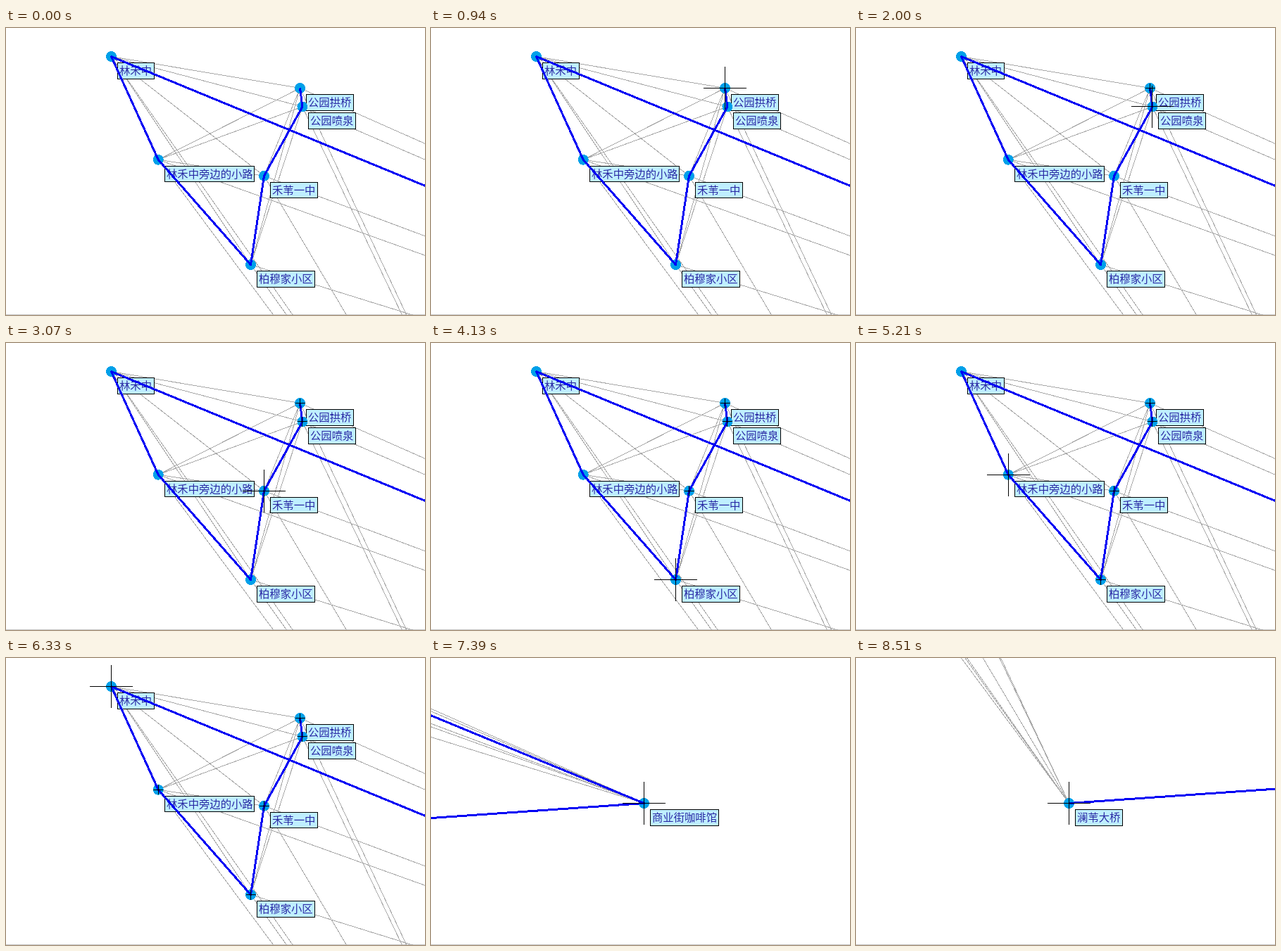
These frames come from a looping animation (595x408 px, 9920 ms). An HTML page:

```html
<!DOCTYPE html>
<html lang="zh-CN">
<head>
<meta charset="utf-8">
<style>
html, body { margin: 0; width: 100%; height: 100%; overflow: hidden; background: #fff; }
svg { display: block; shape-rendering: crispEdges; }
path { fill: none; }
text { font: 300 15.33px "Noto Sans CJK SC", "Noto Sans CJK", sans-serif; fill: #2a2aa4; }
.edges { stroke: #a9a9a9; }
.tour { stroke: #0000f4; stroke-width: 3; stroke-linejoin: round; }
.cross { stroke: #000; }
.dot { fill: #00a0e9; }
.label { fill: #bfefff; stroke: #000; }
</style>
</head>
<body>
<svg width="595" height="408">
  <rect y="407" width="595" height="1" fill="#c8c8c8"/>
  <g id="map"></g>
</svg>
<script>
const LOOP = 9920;

// Stops in visiting order: x, y, label
const stops = [
  [417.5, 85.5, '公园拱桥'],
  [420.9, 111.9, '公园喷泉'],
  [366.5, 210.3, '禾苇一中'],
  [347.5, 336.5, '柏穆家小区'],
  [216.2, 187.2, '林禾中旁边的小路'],
  [149.5, 40.6, '林禾中'],
  [2460.5, 993.5, '商业街咖啡馆'],
  [894.5, 1102.5, '澜苇大桥']
];
// The cursor reaches stop i at arrivals[i]
const arrivals = [940, 2000, 3070, 4130, 5210, 6330, 7390, 8510];

const pathData = points => 'M' + points.map(([x, y]) => `${x} ${y}`).join('L');

const crossData = ([x, y], arm) => `M${x - arm} ${y}h${2 * arm}M${x} ${y - arm}v${2 * arm}`;

function stopMarkup([x, y, name]) {
  const left = Math.floor(x + 9), top = Math.floor(y + 9);
  const width = Math.floor(x + 9 + 15.05 * name.length + 7.9) - left;
  const height = Math.floor(y + 32.5) - top;
  return `<circle class="dot" cx="${x}" cy="${y}" r="7.5"/>
    <rect class="label" x="${left + 0.5}" y="${top + 0.5}" width="${width - 1}" height="${height - 1}"/>
    <text x="${left + 3}" y="${top + 17}">${name}</text>`;
}

const map = document.getElementById('map');
const edges = stops.flatMap((a, i) => stops.slice(i + 1).map(b => pathData([a, b])));
map.innerHTML = `<path class="edges" d="${edges.join('')}"/>
  ${stops.map(stopMarkup).join('')}
  <path class="tour" d="${pathData(stops)}"/>
  <path class="cross"/>`;
const cross = map.querySelector('.cross');

function draw(time) {
  const current = arrivals.filter(t => t <= time).length - 1;
  // Visited stops keep a small cross inside their dot
  cross.setAttribute('d', stops.slice(0, current + 1)
    .map((stop, i) => crossData(stop, i === current ? 30.3 : 7)).join(''));
  // The view centres on stops outside the first screen
  const [dx, dy] = current > 5
    ? [302.5 - stops[current][0], 206.5 - stops[current][1]]
    : [0, 0];
  map.setAttribute('transform', `translate(${dx} ${dy})`);
}

function tick() {
  draw(performance.now() % LOOP);
  requestAnimationFrame(tick);
}
tick();
</script>
</body>
</html>
```
